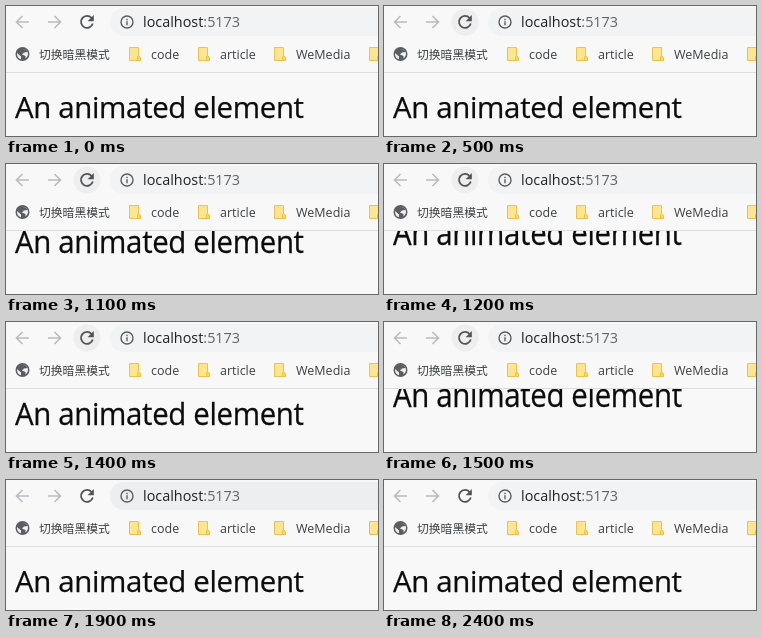
An HTML page for the animation above (2700 ms loop, 372 px wide and 130 px high).

```html
<!DOCTYPE html>
<html lang="en">
<head>
<meta charset="utf-8">
<title>Bouncing heading</title>
<style>
  html, body { margin: 0; width: 100%; height: 100%; overflow: hidden; background: #f8f8f8; }
  svg { display: block; width: 372px; height: 130px; }
  text { font-family: "Open Sans", "Noto Sans", sans-serif; }

  .heading { font-size: 29.4px; letter-spacing: -.33px; fill: #0c0c0c; stroke: #0c0c0c; stroke-width: .25; }
  .address { font-size: 14.4px; fill: #202124; }
  .port { fill: #5f6368; }
  .label { font-size: 12.5px; fill: #3c4043; }
  .cjk { font-family: "Noto Sans CJK SC", "Noto Sans CJK", sans-serif; font-size: 11.8px; }
  .line { fill: none; stroke-width: 1.6; }

  .heading, .hover, .omnibox { animation: 2.7s step-end infinite; }
  .heading { animation-name: bounce; transform-origin: 9px 119px; }
  .hover { animation-name: hover; fill: #eee; }
  .omnibox { animation-name: omnibox; }

  /* Two bounces, the first cut short by a second reload */
  @keyframes bounce {
    0%, 70.37%, 100% { transform: none; }
    40.74%  { transform: translateY(-22px) scaleY(1.07); }
    44.444% { transform: translateY(-30px) scaleY(1.1); }
    51.851% { transform: translateY(-8px) scaleY(1.03); }
    55.555% { transform: translateY(-26px) scaleY(1.09); }
    59.259% { transform: translateY(-30px) scaleY(1.1); }
    62.962% { transform: translateY(-7px) scaleY(1.03); }
    66.666% { transform: translateY(-14px) scaleY(1.05); }
  }
  @keyframes hover {
    0%, 70.37%, 100% { opacity: 0; }
    18.518% { opacity: 1; }
  }
  @keyframes omnibox {
    0%, 88.888%, 100% { fill: #f1f3f4; }
    70.37% { fill: #eceef0; }
  }
</style>
</head>
<body>
<svg viewBox="0 0 372 130">
  <defs>
    <g id="folder" stroke="#efc24e">
      <path d="M.5 .5H9.5V8.5L11.5 10.5V13.5H.5Z" fill="#ffe58f"/>
      <path d="M8.5 13.5V10L9.5 8.5L11.5 10.5V13.5Z" fill="#f8d568"/>
    </g>
    <path id="arrow" d="M14 6.5H1.5M7.5 .5L1.5 6.5L7.5 12.5"/>
    <clipPath id="page"><rect y="67" width="372" height="63"/></clipPath>
  </defs>

  <rect width="372" height="130" fill="#f8f8f8"/>
  <g clip-path="url(#page)">
    <text class="heading" x="9" y="111.5">An animated element</text>
  </g>

  <!-- Toolbar -->
  <rect y="66" width="372" height="1" fill="#dcdddf"/>
  <g class="line" stroke="#b9bbbe">
    <use href="#arrow" x="9" y="9.5"/>
    <use href="#arrow" transform="translate(56 9.5) scale(-1 1)"/>
  </g>
  <circle class="hover" cx="81" cy="16" r="13.5"/>
  <path class="line" stroke="#505357" style="stroke-width:1.8" d="M85.6 12A6 6 0 1 0 86.8 17.5"/>
  <path d="M87.8 9V15.2H81.6Z" fill="#505357"/>

  <rect class="omnibox" x="104" y="2" width="300" height="28" rx="14"/>
  <g transform="translate(121 16)" fill="#5a5e63">
    <circle class="line" stroke="#5a5e63" style="stroke-width:1.4" r="6"/>
    <path d="M-.7 -3.2h1.4v1.5h-1.4zM-.7 -.7h1.4v4h-1.4z"/>
  </g>
  <text class="address" x="137" y="21">localhost<tspan class="port">:5173</tspan></text>

  <!-- Bookmarks -->
  <circle cx="16.5" cy="48" r="7" fill="#5a5e63"/>
  <path d="M11 47L15 50.5V53.3Q10.6 52 11 47ZM17 43Q20 43 21.5 46L18 46.5L16 48.5L19.5 50V52.5Q22.8 49.5 21.8 46.5Q20.5 42.6 17 43Z" fill="#f1f1f1"/>
  <text class="label cjk" x="33" y="52.6">切换暗黑模式</text>
  <use href="#folder" x="123" y="41"/>
  <text class="label" x="145" y="53">code</text>
  <use href="#folder" x="192" y="41"/>
  <text class="label" x="214" y="53">article</text>
  <use href="#folder" x="268" y="41"/>
  <text class="label" x="290" y="53">WeMedia</text>
  <use href="#folder" x="363" y="41"/>
</svg>
</body>
</html>
```
